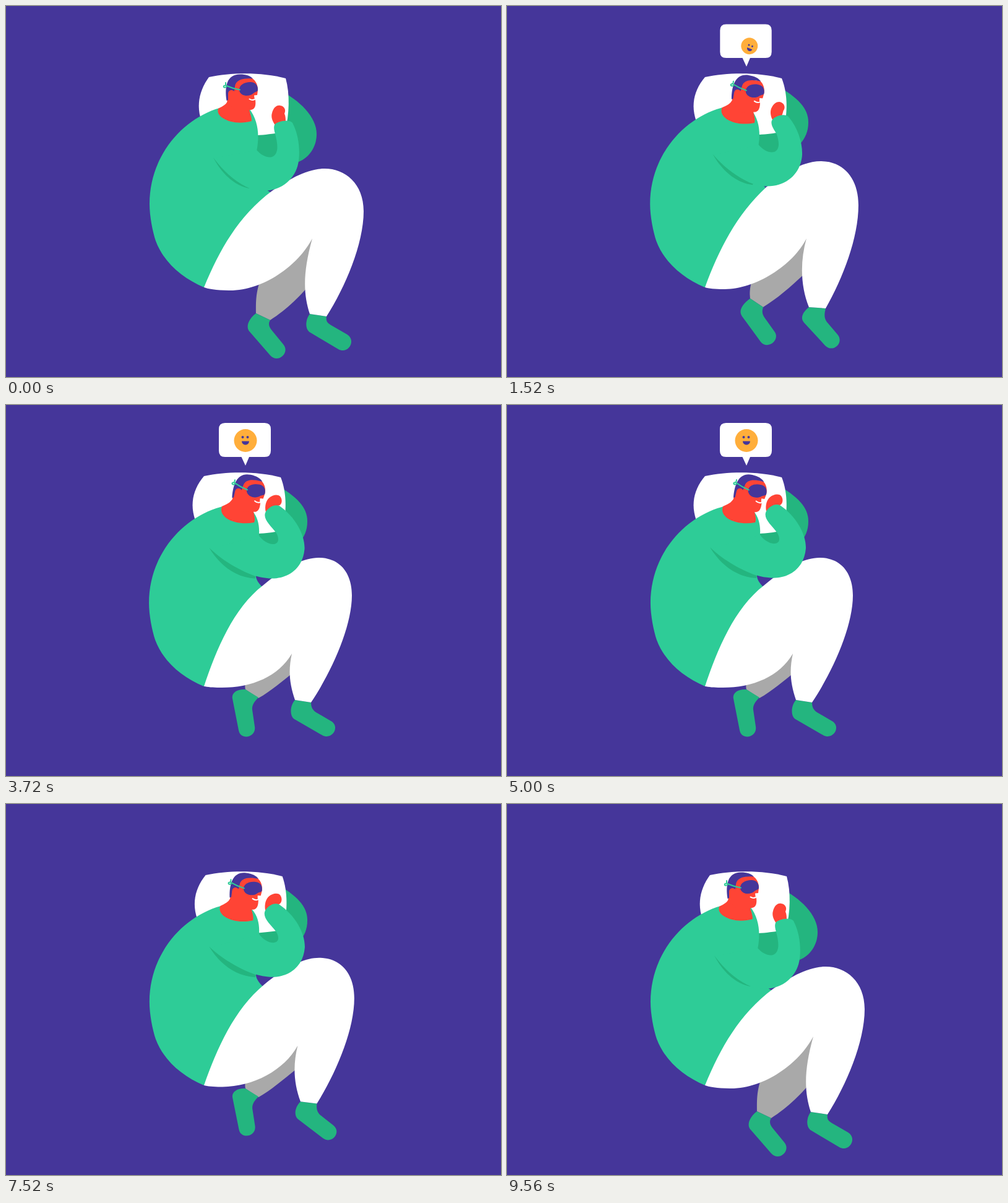
Animation of 800x600 px, one loop 9.6 s. Source, as an HTML page:

```html
<!DOCTYPE html>
<html lang="en">
<head>
<meta charset="utf-8">
<title>Sleeper</title>
<style>
  html, body { margin: 0; width: 100%; height: 100%; overflow: hidden; background: #45369a; }
  svg { display: block; width: 100vw; height: 100vh; }
  .skin { fill: #ff4435; }
  .shirt { fill: #2ecc97; }
  .shade { fill: #24b57f; }
  .white { fill: #fff; }
  .grey { fill: #a9a9a9; }
  .night { fill: #45369a; }
  .line { fill: none; stroke-width: 2; stroke-linecap: round; }
</style>
</head>
<body>
<svg viewBox="0 0 800 600">
  <path id="backArm" class="shade"/>
  <path id="pillow" class="white"/>
  <path id="hand" class="skin"/>
  <path id="body" class="shirt"/>
  <path id="backLeg" class="grey"/>
  <path id="backFoot" class="shade"/>
  <path id="frontFoot" class="shade"/>
  <path id="frontLeg" class="white"/>
  <path id="arm" class="shirt"/>
  <path id="crease" class="shade"/>
  <path id="neck" class="skin"/>
  <g id="head">
    <path class="skin" d="M357,152 C356,130 366,115 398,117 C404,121 407,128 407,136 L406,144 L401,144.500 L401.500,149 L403,152 C404,160 403,167 396,168 L375,172 L359,158Z"/>
    <path class="night" d="M356.500,153 C353,130 357,110.500 378,110.500 C388,110.500 395,113 399,117.500 C384,116 371,119 370,130 L369,138 C365,134 359,136 359,142 L359,152Z"/>
    <path class="night" d="M377,137 C376,128 385,123 395,123 C403,123 407,128 407,135 C407,139 404,138 400,141 C394,147 380,147 377,137Z"/>
    <path class="line" stroke="#2ecc97" d="M378,135.500 C370,134 363,132 355,128.500 M355,128.500 L355,124 M355,128.500 C350,128 351,134 356,131"/>
    <path class="line" stroke="#fff" d="M393.500,150.500 Q398,153 402,151"/>
  </g>
  <g id="bubble">
    <path class="white" d="M354,29 H418 Q428,29 428,39 V74 Q428,84 418,84 H393 L387,98 L380.500,84 H354 Q344,84 344,74 V39 Q344,29 354,29Z"/>
    <g id="emoji">
      <circle r="18.500" fill="#ffae3b"/>
      <g id="look" class="night">
        <ellipse class="eye" cx="-4.500" cy="-5.500" rx="2"/>
        <ellipse class="eye" cx="3.500" cy="-5.500" rx="2"/>
        <path d="M-6,1 H6 A6,6 0 0 1 -6,1Z"/>
      </g>
    </g>
  </g>
</svg>
<script>
const LOOP = 9600, BREATH = 2400;
const $ = id => document.getElementById(id);

// Poses run from stretched out to curled up; "out" and "back" are start and end times.
const parts = {
  backArm: { out: [700, 1500], back: [7500, 8200], poses: [
    'M440,135 C475,152 502,180 502,207 C502,228 490,245 473,252 L440,262 L400,250 L400,190Z',
    'M435,128 C470,148 487,165 487,188 C487,203 482,213 474,223 L440,262 L395,250 L405,190Z'] },
  pillow: { out: [700, 1450], back: [7150, 8100], poses: [
    'M328,115 C365,107 415,107 452,117 C459,142 458,175 451,203 C430,208 370,215 325,206 C304,170 310,140 328,115Z',
    'M320,115 C357,107 407,107 444,117 C454,142 454,175 446,203 C428,208 365,213 315,206 C294,170 299,140 320,115Z'] },
  hand: { out: [1000, 2200], back: [7500, 8300], breath: .05, poses: [
    'M437,195 C430,187 428,179 430,173 C432,165 437,160 443,161 C450,162 453,168 450,174 C452,178 452,184 452,190Z',
    'M419,172 C417,162 420,153 425,149 C431,144 439,143 443,147 C447,152 446,160 441,162 C437,162 431,165 428,172Z'] },
  body: { out: [1000, 2200], back: [7500, 8300], poses: [
    'M345,165 C286,182 232,242 232,320 C232,340 237,365 242,380 C255,415 285,440 320,455 L360,420 L430,302 C426,301 423,299 420,296 L405,235 C410,210 408,185 393,166 C380,155 360,160 345,165Z',
    'M347,165 C286,182 232,242 232,320 C232,340 237,365 242,380 C255,415 285,440 320,455 L360,420 L415,295 C408,288 404,282 404,276 L409,210 C410,195 407,182 399,172 C385,160 360,160 347,165Z'] },
  backLeg: { out: [600, 2440], back: [7480, 8260], poses: [
    'M412,440 C403,465 404,480 404,497 L427,508 C455,490 475,470 500,440 L505,355Z',
    'M396,443 C392,457 392,465 393,473 L414,487 C438,472 455,457 481,433 L486,371Z',
    'M388,445 C386,452 386,456 387,460 L408,474 C428,463 446,447 470,428 L475,380Z'] },
  backFoot: { out: [600, 2440], back: [7480, 8260], poses: [
    'M404,497 C391,507 387,520 394,527 L427,565 C439,579 460,561 448,547 L430,525 C424,518 424,513 427,508Z',
    'M393,473 C379,483 374,494 380,502 L410,543 C421,557 443,540 432,526 L417,505 C412,498 412,494 414,487Z',
    'M387,460 C373,459 364,466 366,475 L376,526 C379,543 405,538 402,520 L398,493 C397,485 402,479 408,473Z'] },
  frontFoot: { out: [850, 2190], back: [7230, 8180], poses: [
    'M491,498 C484,507 483,521 490,527 L537,555 C553,564 567,541 551,531 L525,516 C518,512 517,508 518,502Z',
    'M488,487 C477,496 474,505 480,512 L514,549 C526,562 546,545 534,531 L517,511 C512,504 513,498 515,489Z',
    'M467,477 C459,486 458,503 466,508 L511,534 C527,543 541,520 525,511 L501,497 C495,493 493,488 493,481Z'] },
  frontLeg: { out: [850, 2190], back: [7230, 8180], poses: [
    'M320,455 C345,395 375,340 430,299 C455,282 485,263 515,263 C548,263 578,287 578,332 C578,385 548,455 518,502 L491,498 C480,465 480,430 495,376 C472,420 415,461 360,460 C340,460 325,457 320,455Z',
    'M320,455 C342,395 371,337 419,293 C445,271 478,251 507,251 C545,251 568,280 568,322 C568,375 543,440 515,489 L488,487 C475,455 473,415 484,376 C462,420 400,459 350,458 C337,458 325,457 320,455Z',
    'M320,455 C340,395 368,328 415,292 C440,271 475,247 505,247 C540,247 559,272 559,308 C559,358 527,430 493,481 L467,477 C458,450 456,430 462,402 C440,440 395,458 345,457 C335,457 325,456 320,455Z'] },
  arm: { out: [1000, 2200], back: [7500, 8300], breath: .05, poses: [
    'M405,233 C414,243 425,247 432,243 C440,238 440,225 435,207 C434,203 432,197 434,192 C438,187 456,182 463,189 C474,210 475,235 473,250 C470,275 450,299 415,299 C385,298 355,280 340,245Z',
    'M409,210 C414,218 425,225 433,224 C441,223 442,216 437,207 C428,195 415,185 418,174 C421,166 432,158 441,162 C468,180 484,210 483,232 C480,268 450,283 422,279 C395,277 350,255 330,232Z'] },
  crease: { out: [1000, 2200], back: [7500, 8300], breath: .05, poses: [
    'M335,245 C350,266 372,286 394,295 L393,295 C367,290 347,268 335,245Z',
    'M328,230 C345,247 375,266 404,276 L403,280 C370,278 345,258 328,230Z'] },
  neck: { out: [700, 1950], back: [7050, 8050], poses: [
    'M358,140 L358,153 C357,159 350,162 343,166 C341,172 344,177 350,181 C362,189 380,191 397,186 C397,180 395,175 393,168 L400,160Z',
    'M367,145 L366,152 C362,158 358,160 349,164 C346,172 350,178 356,183 C368,191 385,193 401,190 C403,186 402,181 400,173 L403,160Z'] }
};

const clamp = x => Math.min(1, Math.max(0, x));
const ease = (t, a, b) => (1 - Math.cos(Math.PI * clamp((t - a) / (b - a)))) / 2;
const curl = (t, { out, back }) => ease(t, ...out) - ease(t, ...back);
const spring = (t, start) => {
  const s = (t - start) / 1000;
  return s <= 0 ? 0 : 1 - Math.exp(-6 * s) * Math.cos(Math.PI * s / .3);
};

const NUM = /-?\d+(\.\d+)?/g;
for (const [id, part] of Object.entries(parts)) {
  part.el = $(id);
  part.nums = part.poses.map(d => d.match(NUM).map(Number));
}

function morph({ poses, nums, el }, p) {
  const u = p * (poses.length - 1);
  const i = Math.min(poses.length - 2, Math.floor(u));
  let k = 0;
  el.setAttribute('d', poses[0].replace(NUM, () => {
    const a = nums[i][k], b = nums[i + 1][k++];
    return (a + (b - a) * (u - i)).toFixed(2);
  }));
}

const put = (id, value) => $(id).setAttribute('transform', value);
const eyes = document.querySelectorAll('.eye');

function drawBubble(t) {
  const size = (spring(t, 1060) + .08 * ease(t, 5850, 6050)) * (1 - ease(t, 6050, 6300));
  put('bubble', `translate(387 98) scale(${size}) translate(-387 -98)`);
  const pop = spring(t, 1420), rest = 1 - pop;
  const pulse = 1 + .1 * Math.sin(Math.PI * clamp((t - 3200) / 500));
  put('emoji', `translate(${387 + 18 * rest} ${57.5 + 26 * rest}) rotate(${80 * rest}) scale(${Math.max(0, pop) * pulse})`);
  put('look', `translate(${10 * rest} ${14 * rest})`);
  const blink = Math.sin(Math.PI * clamp((t - 4300) / 240));
  eyes.forEach(e => e.setAttribute('ry', 2 - 1.7 * blink));
}

function draw() {
  const t = performance.now() % LOOP;
  const air = (1 - Math.cos(2 * Math.PI * t / BREATH)) / 2;
  for (const part of Object.values(parts)) {
    morph(part, curl(t, part) * (1 - (part.breath || 0) * air));
  }
  put('body', `translate(420 0) scale(${1 + .005 * air} 1) translate(-420 0)`);
  const nod = curl(t, parts.neck) - .07 * air;
  put('head', `translate(${6.5 * nod} ${-.6 * nod}) rotate(${13 * nod} 370 165)`);
  drawBubble(t);
  requestAnimationFrame(draw);
}
draw();
</script>
</body>
</html>
```
